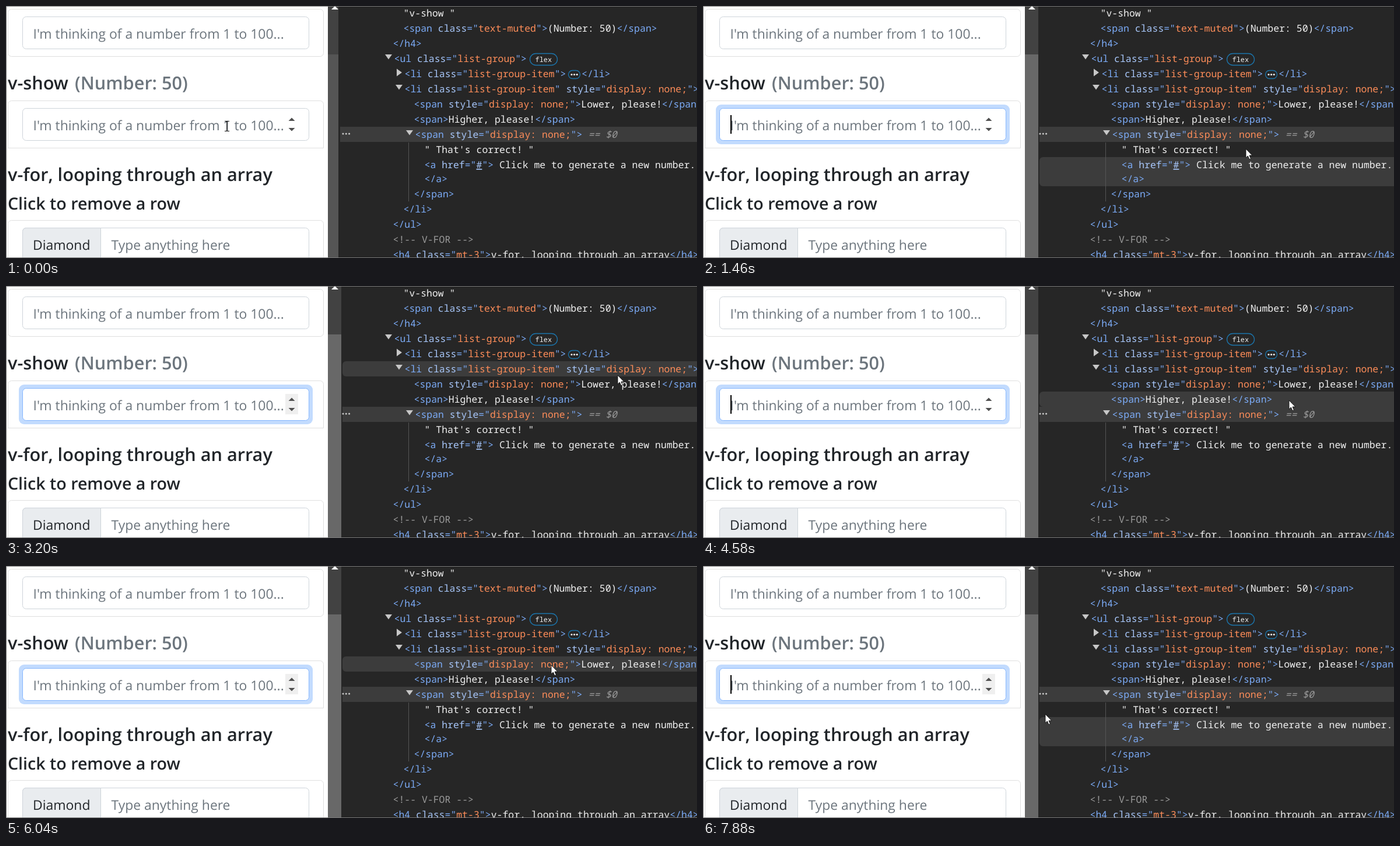
Animation of 1185 by 432 pixels, one loop 8000 ms. Source, as an HTML page:

```html
<!DOCTYPE html>
<html lang="en">
<head>
<meta charset="utf-8">
<title>v-show in the element inspector</title>
<style>
html, body { margin: 0; width: 100%; height: 100%; overflow: hidden; background: #fff; }
svg { display: block; width: 1185px; height: 432px; }
text { white-space: pre; text-rendering: geometricPrecision; }
.ui { font: 22.9px "Open Sans", "Noto Sans", sans-serif; fill: #212529; }
.ui.h4 { font-size: 30.7px; font-weight: 600; }
.ui.h5 { font-size: 28.6px; font-weight: 600; }
.ui.muted { fill: #6c757d; }
.code { font: 16.495px "Noto Sans Mono", "DejaVu Sans Mono", monospace; fill: #f1f1f1; }
.code.small { font-size: 11.9px; }
.tag { fill: #7cacf8; }
.attr { fill: #a8c7fa; }
.value { fill: #fe8d59; }
.link { fill: #a8c7fa; text-decoration: underline; }
.note { fill: #9a9a9a; }
.code.note { font-style: italic; }
.card { fill: #fff; stroke: #dfdfdf; }
.field { fill: #fff; stroke: #ced4da; }
.field.focused { stroke: #86b7fe; }
.mark { fill: #c7c7c7; }
.badge { fill: none; stroke: #1b75ac; stroke-width: 1.3; }
</style>
</head>
<body>
<svg id="stage" viewBox="0 0 1185 432" xmlns="http://www.w3.org/2000/svg"></svg>
<script>
const LOOP = 8000;
const STEP = LOOP / 60;   // the screen refreshes in even steps
const FOCUS = 2 * STEP;   // the field is clicked
const LEAVE = 6 * STEP;   // the pointer leaves the field
const BLINK = 520;
const ROW = 26;

// Pointer stops: time, x, y.
const PATH = [
  [0, 379, 206], [133, 371, 202], [700, 371, 202], [1070, 760, 312],
  [1467, 931, 245], [2000, 1040, 325], [2400, 1084, 159], [3200, 1049, 153],
  [4000, 1136, 154], [4533, 1005, 196], [4933, 838, 172], [5400, 841, 173],
  [6000, 935, 170], [6400, 940, 234], [7333, 870, 228], [7733, 690, 268],
  [7866, 587, 254]
];

// Two spaces per level; a leading triangle marks a node that can be folded.
const LISTING = `
  "v-show "
  <span class="text-muted">(Number: 50)</span>
</h4>
▼<ul class="list-group">
  ▶<li class="list-group-item">
  ▼<li class="list-group-item" style="display: none;">
    <span style="display: none;">Lower, please!</span>
    <span>Higher, please!</span>
    ▼<span style="display: none;">
      " That's correct! "
      <a href="#"> Click me to generate a new number. "
      </a>
    </span>
  </li>
</ul>
<!-- V-FOR -->
<h4 class="mt-3">v-for, looping through an array</h4>`.split("\n").slice(1);

const esc = s => s.replace(/&/g, "&amp;").replace(/</g, "&lt;").replace(/>/g, "&gt;");
const span = (cls, s) => `<tspan class="${cls}">${esc(s)}</tspan>`;

// Colours one line of markup.
function paint(line) {
  if (line.startsWith("<!--")) return span("note", line);
  return line.split(/(<[^>]*>)/).map(part => {
    if (!part.startsWith("<")) return esc(part);
    return part.split(/([\w-]+="[^"]*")/).map(bit => {
      const m = bit.match(/^([\w-]+)="(.*)"$/);
      if (!m) return span("tag", bit);
      const cls = m[1] === "href" ? "link" : "value";
      return span("attr", m[1]) + span("tag", '="') + span(cls, m[2]) + span("tag", '"');
    }).join("");
  }).join("");
}

const ui = (x, y, cls, s) => `<text class="ui ${cls}" x="${x}" y="${y}">${s}</text>`;
const code = (x, y, s, cls = "") => `<text class="code ${cls}" x="${x}" y="${y}">${s}</text>`;
const box = (cls, x, y, w, h, r = 6) =>
  `<rect class="${cls}" x="${x}" y="${y}" width="${w}" height="${h}" rx="${r}"/>`;
const dots = (x, y, gap, fill) =>
  [0, 1, 2].map(i => `<circle cx="${x + i * gap}" cy="${y}" r="1.6" fill="${fill}"/>`).join("");

const FOLDS = { "▼": "M-15.5-13h12l-6 8.5z", "▶": "M-13.5-14.5v13l9-6.5z" };

function listingRow(line, i) {
  const [, indent, fold, markup] = line.match(/^( *)([▼▶]?)(.*)$/);
  const x = 663.5 + 9 * indent.length + (fold ? 2 : 0);
  const y = 18 + ROW * i - (i > 10 ? 2 : 0);
  const mark = fold ? `<path class="mark" transform="translate(${x},${y})" d="${FOLDS[fold]}"/>` : "";
  return mark + code(x, y, paint(markup));
}

const HINT = "I'm thinking of a number from 1 to 100...";

const page = `
  <rect width="553" height="432" fill="#fff"/>
  ${box("card", 3.5, 5.5, 541, 81)}
  ${box("field", 28.5, 18.5, 491, 55)}
  ${ui(46.6, 56, "muted", HINT)}
  ${ui(3, 143, "h4", "v-show")}
  ${ui(118, 143, "h4 muted", "(Number: 50)")}
  <path class="card" d="M3.5 243.5V168.5a6 6 0 0 1 6-6H538.5a6 6 0 0 1 6 6V243.5z"/>
  <rect id="ring" x="22" y="169" width="504" height="68" rx="9" fill="#c2dbfe"/>
  <rect id="field" class="field" x="28.5" y="175.5" width="491" height="55" rx="6"/>
  ${ui(46.6, 213, "muted", HINT)}
  <rect id="spinner" x="479" y="185" width="22" height="35" fill="#efefef"/>
  <path d="M484.5 197h11l-5.5-5.5zM484.5 209h11l-5.5 5.5z" fill="#505050"/>
  <rect id="caret" x="47" y="187" width="2" height="32" fill="#000"/>
  ${ui(3, 300, "h4", "v-for, looping through an array")}
  ${ui(3, 349, "h5", "Click to remove a row")}
  ${box("card", 3.5, 367.5, 541, 90)}
  ${box("field", 28.5, 380.5, 491, 70)}
  <path d="M162.5 450V380.5H34.5a6 6 0 0 0-6 6V450z" fill="#e9ecef" stroke="#ced4da"/>
  ${ui(46, 418, "", "Diamond")}
  ${ui(180.5, 418, "muted", "Type anything here")}`;

const inspector = `
  <rect id="panel" width="620" height="432" fill="#262626"/>
  <rect id="selected" y="207" width="620" height="${ROW}" fill="#3c3c3c"/>
  <rect id="hover" x="577" width="620" rx="6" fill="#3c3c3c"/>
  <path d="M690.5 234V335" stroke="#555"/>
  ${LISTING.map(listingRow).join("")}
  ${code(987, 122, paint("</li>"))}
  ${code(998.5, 226, "== $0", "note")}
  ${box("badge", 898.5, 81.5, 47, 20, 10)}
  ${code(907.5, 96, "flex", "small")}
  ${box("badge", 964.5, 110.5, 20, 14, 7)}
  ${dots(970, 117.5, 4.6, "#f1f1f1")}
  ${dots(578, 219, 5.3, "#c7c7c7")}`;

const stage = document.getElementById("stage");
stage.innerHTML = `${page}
  <rect x="552" width="25" height="83" fill="#424242"/>
  <rect id="thumb" x="552" y="83" width="25" height="349"/>
  <path d="M558 6h12l-6-6z" fill="#fff"/>
  ${inspector}
  <path d="M0 .5H1185M0 431.5H1185M.5 0V432" stroke="#777" fill="none"/>
  <path id="beam" d="M-4-8.5h3l1 1 1-1h3M0-7.5V7.5M-4 8.5h3l1-1 1 1h3" fill="none" stroke="#000" stroke-width="1.2"/>
  <path id="arrow" d="M0 0V15.2L3.4 12 5.9 17.8 8.4 16.7 6 11.1H10.8z" fill="#fff" stroke="#111" stroke-width=".9"/>`;

const part = {};
stage.querySelectorAll("[id]").forEach(el => part[el.id] = el);
const set = (id, attrs) => {
  for (const name in attrs) part[id].setAttribute(name, attrs[name]);
};
const show = (id, on) => set(id, { visibility: on ? "visible" : "hidden" });
const ease = k => k * k * (3 - 2 * k);

function pointerAt(t) {
  const i = PATH.findIndex(p => p[0] > t);
  if (i < 0) return PATH[PATH.length - 1].slice(1);
  const [t0, x0, y0] = PATH[i - 1], [t1, x1, y1] = PATH[i];
  const k = ease((t - t0) / (t1 - t0));
  return [x0 + (x1 - x0) * k, y0 + (y1 - y0) * k];
}

// The line under the pointer; the link covers two lines.
function lineAt([x, y]) {
  if (x < 577) return { y: 0, height: 0 };
  if (y >= 259 && y < 309) return { y: 259, height: 50 };
  const first = y < 259 ? 129 : 309;
  return { y: first + ROW * Math.floor((y - first) / ROW), height: ROW };
}

function draw(time) {
  const t = Math.floor(time / STEP + 0.1) * STEP;
  const focused = t >= FOCUS;
  const moving = t >= LEAVE;
  const caretOn = focused && Math.floor((t - 275) / BLINK) % 2 === 0;
  const pointer = pointerAt(t);

  set("ring", { opacity: Math.min(1, Math.max(0, (t - FOCUS + STEP) / (2 * STEP))) * focused });
  part.field.classList.toggle("focused", focused);
  show("caret", caretOn);
  show("spinner", moving && (!caretOn || pointer[0] < 620));

  set("panel", { x: focused ? 575 : 570 });
  set("selected", { x: focused ? 577 : 573 });
  set("thumb", { fill: focused ? "#686868" : "#555" });

  // Highlighting trails the pointer by one refresh.
  set("hover", lineAt(pointerAt(Math.max(0, t - STEP))));

  const at = `translate(${pointer})`;
  set("beam", { transform: at });
  set("arrow", { transform: at });
  show("beam", !moving);
  show("arrow", moving);
}

const start = performance.now();
function tick() {
  draw((performance.now() - start) % LOOP);
  requestAnimationFrame(tick);
}
tick();
</script>
</body>
</html>
```
